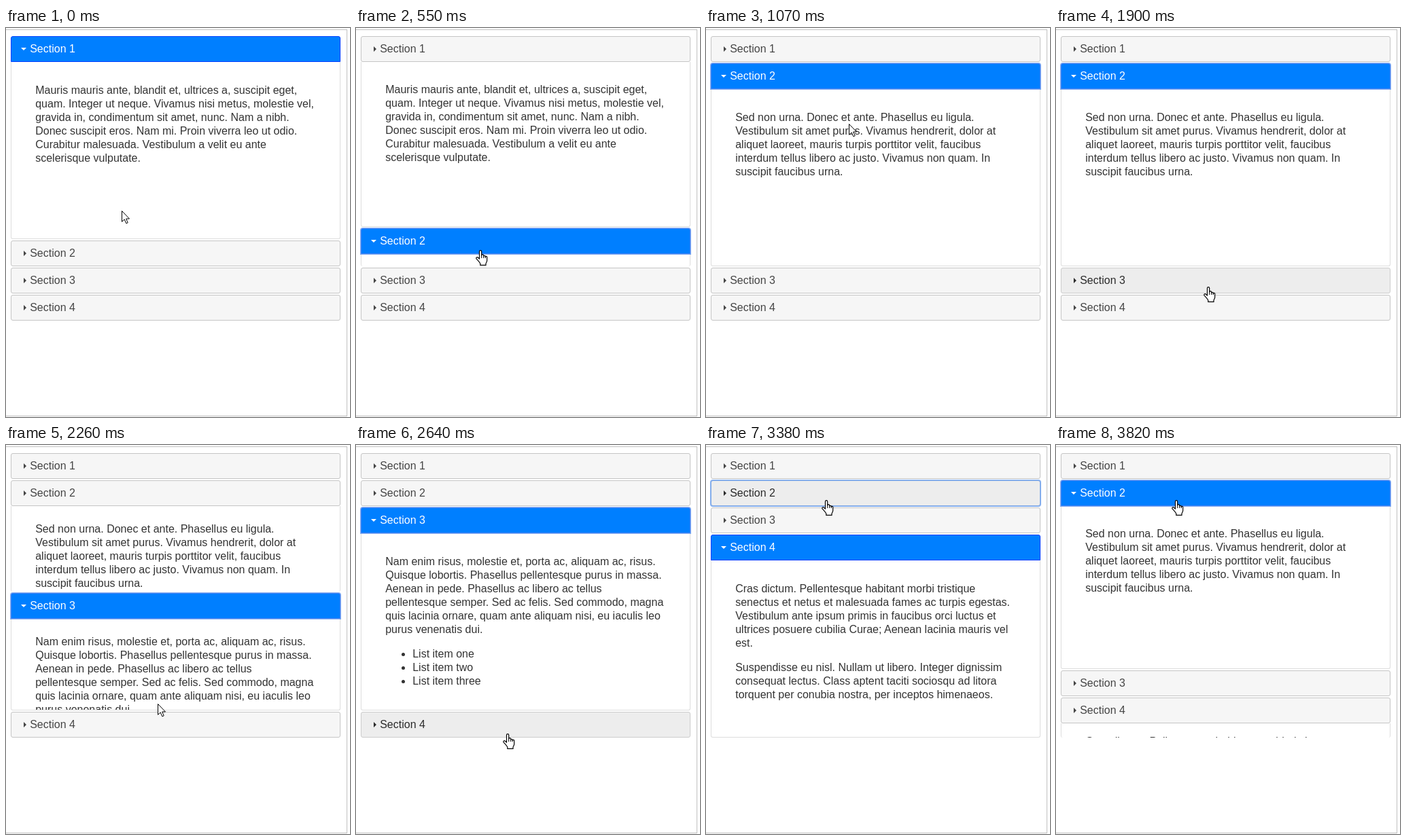
These frames come from a looping animation (506 px wide and 573 px high, 3.88 s). An HTML page:

```html
<!DOCTYPE html>
<html lang="en">
<head>
<meta charset="utf-8">
<title>Accordion</title>
<style>
html, body { margin: 0; width: 100%; height: 100%; overflow: hidden; background: #fff; }
body { position: relative; font: 16px/20px "Liberation Sans", Arial, sans-serif; color: #333; }
* { box-sizing: border-box; }
.frame { position: absolute; left: -1px; top: 2px; width: 503px; height: 570px; border: 1px solid #c0c0c0; }
.header, .panel { position: absolute; left: 7px; width: 485px; white-space: pre; }
.header {
  height: 38px; padding: 8px 0 8px 27.2px;
  border: 1px solid #c5c5c5; border-radius: 3px; background: #f6f6f6; color: #454545;
}
.header::before {
  content: ""; position: absolute; left: 18px; top: 14px; width: 4px; height: 8px;
  background: currentColor; clip-path: polygon(0 0, 100% 50%, 0 100%);
}
.header.hover { background: #ededed; border-color: #ccc; color: #2b2b2b; }
.header.active { background: #007fff; border-color: #003eff; color: #fff; border-radius: 3px 3px 0 0; }
.header.active::before { left: 14px; top: 16px; width: 8px; height: 4px; clip-path: polygon(0 0, 100% 0, 50% 100%); }
.header.focus { outline: 2px solid rgba(100, 155, 238, .75); outline-offset: -1px; z-index: 1; }
.panel {
  padding: 0 35.2px; overflow: hidden; background: #fff;
  border: 1px solid #ddd; border-top: 0; border-radius: 0 0 3px 3px;
}
.panel p, .panel ul { margin: 16px 0; }
.panel ul { padding-left: 40px; }
svg { position: absolute; left: 0; top: 0; z-index: 2; overflow: visible; }
svg path { fill: #fff; stroke: #000; stroke-linejoin: round; }
</style>
</head>
<body>
<div class="frame"></div>
<svg width="20" height="24">
  <path id="arrow" d="M.5 .5V16.3L4.2 12.9 6.8 18.8 9.2 17.8 6.7 12H11.5Z"/>
  <g id="hand" transform="translate(-6)">
    <path stroke-width="1.2" d="M5.5 13V2.2a1.6 1.6 0 0 1 3.2 0V8a1.5 1.5 0 0 1 3 .3V9a1.4 1.4 0 0 1 2.6 .5v.7a1.2 1.2 0 0 1 2.4 .8v4.5c0 2-1.2 3-1.7 4.5v2.4H6.8V20C5.5 17.5 2.5 14.5 1 12.8 .2 11.5 1.8 10.1 3.3 11Z"/>
    <path d="M8.7 8v4M11.7 9v3M14.3 10v2"/>
  </g>
</svg>
<script>
const LOOP = 3880, SLIDE = 400, PANEL_HEIGHT = 261, PADDING = 16;

const texts = [
`<p>Mauris mauris ante, blandit et, ultrices a, suscipit eget,
quam. Integer ut neque. Vivamus nisi metus, molestie vel,
gravida in, condimentum sit amet, nunc. Nam a nibh.
Donec suscipit eros. Nam mi. Proin viverra leo ut odio.
Curabitur malesuada. Vestibulum a velit eu ante
scelerisque vulputate.</p>`,
`<p>Sed non urna. Donec et ante. Phasellus eu ligula.
Vestibulum sit amet purus. Vivamus hendrerit, dolor at
aliquet laoreet, mauris turpis porttitor velit, faucibus
interdum tellus libero ac justo. Vivamus non quam. In
suscipit faucibus urna.</p>`,
`<p>Nam enim risus, molestie et, porta ac, aliquam ac, risus.
Quisque lobortis. Phasellus pellentesque purus in massa.
Aenean in pede. Phasellus ac libero ac tellus
pellentesque semper. Sed ac felis. Sed commodo, magna
quis lacinia ornare, quam ante aliquam nisi, eu iaculis leo
purus venenatis dui.</p><ul><li>List item one</li><li>List item two</li><li>List item three</li></ul>`,
`<p>Cras dictum. Pellentesque habitant morbi tristique
senectus et netus et malesuada fames ac turpis egestas.
Vestibulum ante ipsum primis in faucibus orci luctus et
ultrices posuere cubilia Curae; Aenean lacinia mauris vel
est.</p><p>Suspendisse eu nisl. Nullam ut libero. Integer dignissim
consequat lectus. Class aptent taciti sociosqu ad litora
torquent per conubia nostra, per inceptos himenaeos.</p>`
];

// [time, section]
const clicks = [[-SLIDE, 0], [482, 1], [2055, 2], [2804, 3], [3494, 1]];
const focuses = [[0, -1], [410, 1], [1900, 2], [2780, 3], [3380, 1]];
// [time, x, y] of the pointer's hot spot
const pointer = [
  [0, 170, 269], [190, 182, 327], [620, 182, 327], [1070, 210, 141], [1150, 199, 112],
  [1220, 191, 103], [1450, 216, 351], [1660, 216, 351], [1740, 223, 381], [2260, 223, 381],
  [2640, 222, 425], [2780, 222, 425], [3000, 192, 229], [3300, 176, 81], [LOOP, 176, 81]
];
const bursts = [
  [0, 0, 1], [60, 190, 3], [330, 410, 2], [550, 1070, 8], [1150, 1450, 5], [1740, 2260, 7],
  [2340, 2640, 5], [2780, 3300, 8], [3380, 3380, 1], [3520, 3820, 5]
];
const refreshes = bursts.flatMap(([first, last, count]) =>
  Array.from({ length: count }, (_, i) =>
    Math.round((first + (last - first) * i / Math.max(1, count - 1)) / 10) * 10));

function add(className, html) {
  const element = document.createElement("div");
  element.className = className;
  element.innerHTML = html;
  return document.body.appendChild(element);
}
const sections = texts.map((text, i) => ({
  header: add("header", `Section ${i + 1}`),
  panel: add("panel", text)
}));
const cursor = document.querySelector("svg");
const arrow = document.getElementById("arrow");
const hand = document.getElementById("hand");

const lastIndex = (list, time) => list.findLastIndex(([start]) => start <= time);

function pointerAt(time) {
  const i = Math.min(lastIndex(pointer, time), pointer.length - 2);
  const [t0, x0, y0] = pointer[i], [t1, x1, y1] = pointer[i + 1];
  const k = (time - t0) / (t1 - t0);
  return [Math.round(x0 + (x1 - x0) * k), Math.round(y0 + (y1 - y0) * k)];
}

function closingHeight(part) {
  return Math.round(228 * part) + 2 * Math.round(PADDING * part) + Math.round(part);
}

function draw(time) {
  const click = lastIndex(clicks, time);
  const [start, opening] = clicks[click];
  const closing = click ? clicks[click - 1][1] : -1;
  const focused = focuses[lastIndex(focuses, time)][1];
  const progress = Math.min(1, (time - start) / SLIDE);
  const shown = 0.5 - Math.cos(Math.PI * progress) / 2;
  const closingSize = closingHeight(1 - shown);
  const [x, y] = pointerAt(time);
  let top = 12, overHeader = false;

  sections.forEach(({ header, panel }, i) => {
    const hover = y >= top && y < top + 38;
    overHeader ||= hover;
    header.style.top = top + "px";
    header.classList.toggle("active", i === opening);
    header.classList.toggle("hover", hover && i !== opening);
    header.classList.toggle("focus", i === focused);
    top += 38;

    const part = i === opening ? shown : i === closing ? 1 - shown : 0;
    const height = i === opening ? PANEL_HEIGHT - closingSize : i === closing ? closingSize : 0;
    panel.style.display = height ? "block" : "none";
    panel.style.top = top + "px";
    panel.style.height = height + "px";
    panel.style.paddingTop = Math.min(height, Math.round(PADDING * part)) + "px";
    panel.style.borderBottomWidth = Math.round(part) + "px";
    top += height + 2;
  });

  cursor.style.transform = `translate(${x}px, ${y}px)`;
  arrow.style.display = overHeader ? "none" : "";
  hand.style.display = overHeader ? "" : "none";
}

function tick() {
  const time = performance.now() % LOOP;
  draw(refreshes.findLast(refresh => refresh <= time));
  requestAnimationFrame(tick);
}
tick();
</script>
</body>
</html>
```
